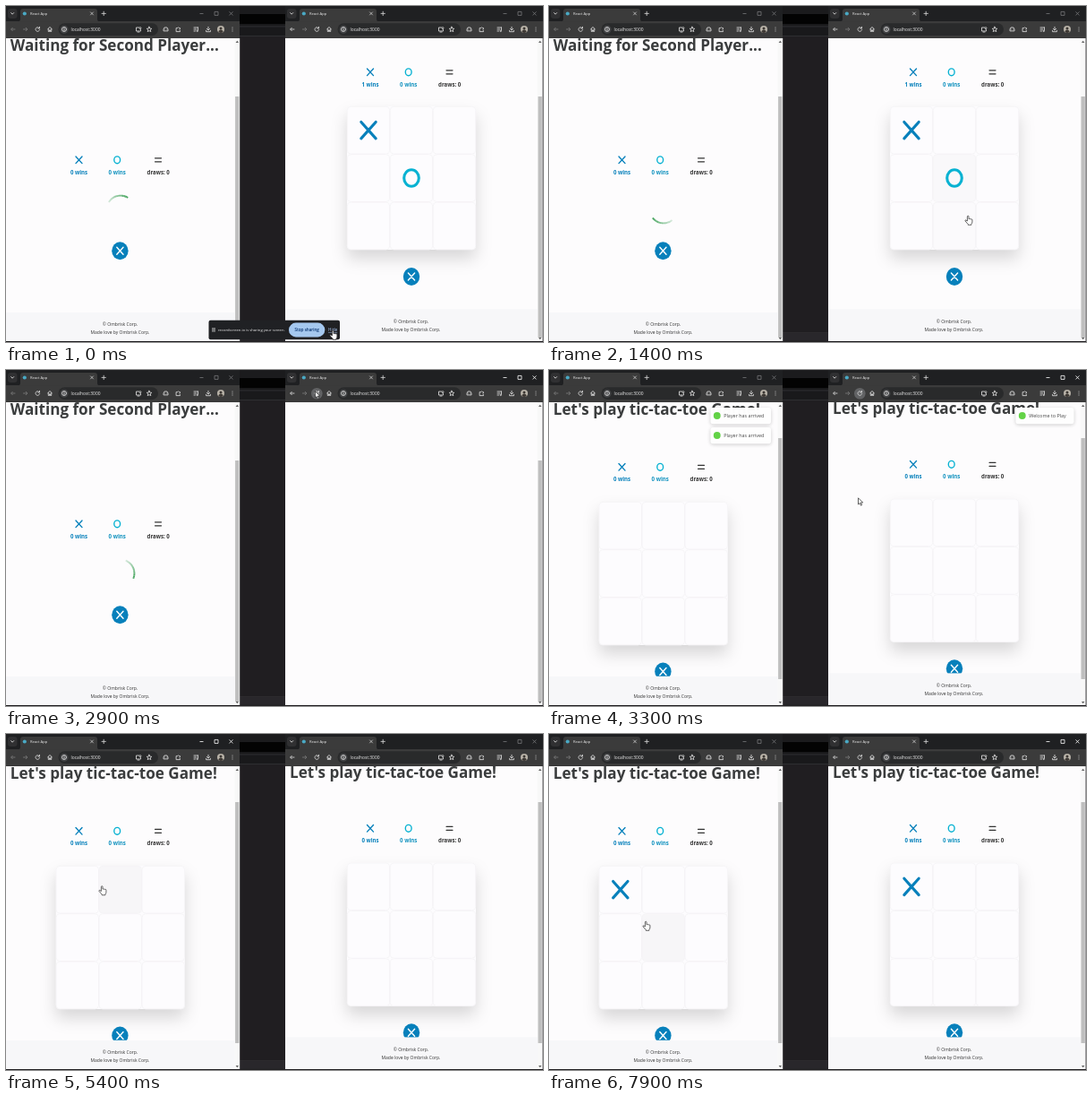
An HTML page for the animation above (8000 ms loop, 600 px wide and 375 px high).

```html
<!DOCTYPE html>
<html lang="en">
<head>
<meta charset="utf-8">
<title>Tic-tac-toe, two players</title>
<style>
  html, body { margin: 0; width: 100%; height: 100%; overflow: hidden; background: #201e21; }
  #stage { display: block; width: 600px; height: 375px; font-family: "Open Sans", "Noto Sans", sans-serif; }
  .h1 { font-size: 17.1px; font-weight: 700; fill: #3a3c3d; }
  .score { font-size: 6.1px; font-weight: 700; text-anchor: middle; }
  .foot { font-size: 5px; fill: #333; text-anchor: middle; }
  .toast text { font-size: 5.5px; fill: #444; }
  .toast rect { fill: #fff; filter: drop-shadow(0 1px 2px rgba(0, 0, 0, .2)); }
  .board { fill: #fdfcfe; filter: drop-shadow(0 10px 9px rgba(0, 0, 0, .15)); }
  .icon { fill: none; stroke: #d4d4d4; stroke-width: .9; stroke-linecap: round; stroke-linejoin: round; }
</style>
</head>
<body>
<svg id="stage" viewBox="0 0 600 375"></svg>
<script>
const LOOP = 8000, STEP = 100;
const BLUE = '#0780bb', CYAN = '#08b2d2', INK = '#333';
const CELL_W = 48, CELL_H = 53.4;

const rect = (x, y, w, h, fill, r = 0, more = '') =>
  `<rect x="${x}" y="${y}" width="${w}" height="${h}" rx="${r}" fill="${fill}" ${more}/>`;
const line = (d, color, width, more = '') =>
  `<path d="${d}" fill="none" stroke="${color}" stroke-width="${width}" stroke-linecap="round" ${more}/>`;
const label = (x, y, text, attrs) => `<text x="${x}" y="${y}" ${attrs}>${text}</text>`;
const cross = (x, y, rx, ry, color, width, more) =>
  line(`M${x - rx} ${y - ry}L${x + rx} ${y + ry}M${x + rx} ${y - ry}L${x - rx} ${y + ry}`, color, width, more);
const ring = (x, y, rx, ry, width) =>
  `<ellipse cx="${x}" cy="${y}" rx="${rx}" ry="${ry}" fill="none" stroke="${CYAN}" stroke-width="${width}"/>`;
const at = (x, y, body) => `<g transform="translate(${x} ${y})">${body}</g>`;
const icon = (x, d) => at(x, 26, `<path class="icon" d="${d}"/>`);

function score(x, y, xWins) {
  return cross(x, y, 3.5, 3.8, BLUE, 1.4) + ring(x + 42.7, y, 3.4, 3.9, 1.4) +
    line(`M${x + 85} ${y - 2}h7M${x + 85} ${y + 2}h7`, INK, 1.2) +
    label(x, y + 15.9, `${xWins} wins`, `class="score" fill="${BLUE}"`) +
    label(x + 42.7, y + 15.9, '0 wins', 'class="score" fill="#1192bf"') +
    label(x + 88.7, y + 15.9, 'draws: 0', `class="score" fill="${INK}"`);
}

function badge(x, y) {
  return `<ellipse cx="${x}" cy="${y}" rx="9.2" ry="10" fill="${BLUE}"/>` + cross(x, y, 3.6, 4, '#fff', 1.4);
}

function board(x, y, id) {
  let s = rect(x, y, 144, 160, '#fdfcfe', 5, 'class="board"');
  for (let i = 0; i < 9; i++) {
    s += rect(x + i % 3 * CELL_W + .3, y + (i / 3 | 0) * CELL_H + .3, CELL_W - .6, CELL_H - .6, '#fdfcfe', 4,
      `stroke="#f5f4f7" stroke-width=".9" id="${id}${i}"`);
  }
  return s;
}

const bigCross = (x, y, more) => cross(x + 24, y + 26.7, 8.2, 9.2, BLUE, 3.1, more);

function toast(id, x, y, w, text) {
  return `<g class="toast" id="${id}">` + rect(x, y - 9.3, w, 18.6, '#fff', 3) +
    `<circle cx="${x + 7.4}" cy="${y}" r="4" fill="#61d345"/>` +
    line(`M${x + 5.6} ${y + .2}l1.3 1.4l2.4 -3`, '#fff', 1, 'class="tick"') +
    label(x + 15, y + 2, text, '') + '</g>';
}

function footer(x, w, cx, y) {
  return rect(x, y, w, 40, '#f7f7f9') +
    label(cx, y + 15.6, '© Ombrisk Corp.', 'class="foot"') +
    label(cx, y + 24.2, 'Made love by Ombrisk Corp.', 'class="foot"');
}

const scene = (id, body) => `<g id="${id}">${body}</g>`;

const page = (x, w, body) =>
  `<svg x="${x}" y="36" width="${w}" height="338" viewBox="${x} 36 ${w} 338">` +
  rect(x, 36, w, 338, '#fdfcfd') + body + '</svg>';

function scrollbar(id, x) {
  return rect(x, 36, 5.8, 338, '#f8f8f8') + rect(x + .7, 101, 4.3, 269, '#bfbfbf', 0, `id="${id}"`) +
    `<path d="M${x + 1.2} 41l1.7-2.2 1.7 2.2zM${x + 1.2} 370l1.7 2.2 1.7-2.2z" fill="#606060"/>`;
}

function chrome(id, x, right, boxEnd, backColor) {
  const r = n => right - n;
  return rect(x, 0, right - x, 20, '#1f2022') + rect(x, 17, right - x, 19, '#3b3b3b') +
    rect(x + 2, 3, 10.5, 11, '#303032', 3) + line(`M${x + 5.7} 7.6l1.5 1.6l1.5 -1.6`, '#ddd', .9) +
    `<path d="M${x + 13} 17.5q3 0 3-3V6q0-3 3-3h80q3 0 3 3v8.5q0 3 3 3z" fill="#3b3b3b"/>` +
    `<circle cx="${x + 20.8}" cy="8.5" r="2.1" fill="#49a9c4"/>` +
    label(x + 27, 10, 'React App', 'font-size="4.1" fill="#eee"') +
    cross(x + 96, 8.4, 1.5, 1.5, '#ddd', .7) + line(`M${x + 107} 8.4h4.4m-2.2-2.2v4.4`, '#ddd', .8) +
    `<path id="${id}ctl" d="M${r(44.5)} 8.5h4M${r(28)} 6.4h4v4h-4zM${r(11.5)} 6.4l4 4m0-4l-4 4" fill="none" stroke-width=".8"/>` +
    (id === 'R' ? '<circle id="reload" cx="347.3" cy="26.2" r="6.3" fill="#626365"/>' : '') +
    `<g style="--c:${backColor}">` +
    at(x + 8, 26, `<path d="M2.4 0h-4.8m2-2l-2 2l2 2" fill="none" stroke="${backColor}" stroke-width=".9"/>`) +
    at(x + 21.5, 26, '<path d="M-2.4 0h4.8m-2-2l2 2l-2 2" fill="none" stroke="#777" stroke-width=".9"/>') + '</g>' +
    icon(x + 35.3, 'M2 -1.2A2.3 2.3 0 1 0 2.3 .6M2.2 -2.7v1.7h-1.7') +
    icon(x + 49, 'M-2.3 -.3L0 -2.5L2.3 -.3M-1.7 -.5v3h1.2v-1.7h1v1.7h1.2v-3') +
    rect(x + 58.5, 19.3, boxEnd - x - 58.5, 13.6, '#292a2b', 6.8) +
    `<circle cx="${x + 65}" cy="26.2" r="4.6" fill="#414244"/>` +
    icon(x + 65, 'M0 -.3v1.7M0 -1.6v.1M2.5 0a2.5 2.5 0 1 1-5 0a2.5 2.5 0 1 1 5 0') +
    label(x + 72.5, 28.2, 'localhost:3000', 'font-size="4.9" fill="#eee"') +
    icon(boxEnd - 22, 'M.5 -2h-3v4h5v-1.4M-1 3h2M2 -2.6v2.4m-1-1l1 1l1-1') +
    icon(boxEnd - 10, 'M0 -2.8l.8 1.9 2 .2-1.5 1.3.5 2L0 1.6l-1.8 1 .5-2-1.5-1.3 2-.2z') +
    icon(r(82.5), 'M-2.5 1.5v-1.5l1-2h3l1 2v1.5zM-1.4 .2h.1M1.4 .2h.1') +
    icon(r(68.5), 'M-2 -1.4h1.2q.8-1.8 1.6 0h1.2v1.3q-1.6.8 0 1.6v1.1h-4z') +
    icon(r(48.5), 'M-2.5 -2h4.5M-2.5 0h2.6M-2.5 2h1.5M2 -2v3.5a.8.8 0 1 1-.8-.5') +
    icon(r(35), 'M0 -2.7v3.6m-1.6-1.5l1.6 1.6l1.6-1.6M-2.4 1.3v1.4h4.8v-1.4') +
    at(r(21), 26, '<circle r="4" fill="#b9b3a8"/><circle cy="-1" r="1.5" fill="#3d3834"/>' +
      '<path d="M-2.7 2.9q.3-2.5 2.7-2.5t2.7 2.5q-2.7 2-5.4 0z" fill="#3d3834"/>') +
    icon(r(8), 'M0 -2v.1M0 0v.1M0 2v.1');
}

function desktop() {
  return rect(0, 0, 600, 375, '#201e21') + rect(261, 0, 51, 9, '#1b1b1d') + rect(261, 9, 51, 11, '#030303') +
    rect(261, 20, 51, 14, '#19191b') + rect(261, 22.5, 51, .8, '#353538') + rect(261, 33, 51, .8, '#343437') +
    rect(261, 364.5, 51, .8, '#38363a') + rect(261, 365.3, 51, 8.5, '#29272b');
}

function shareBar() {
  return scene('share', rect(226.5, 350.8, 146.5, 21.4, '#202124', 2) +
    line('M231 359.4v4M233 359.4v4', '#ddd', .9) +
    label(237, 363, 'recordscreen.io is sharing your screen.', 'font-size="4.16" fill="#eee"') +
    rect(316, 353.6, 40.3, 15.8, '#a5c8ef', 7.9) +
    label(336.2, 363.2, 'Stop sharing', 'font-size="4.7" fill="#123d79" stroke="#123d79" stroke-width=".12" text-anchor="middle"') +
    label(360, 363, 'Hide', 'font-size="4.7" fill="#a9c7f5" text-decoration="underline"'));
}

// Quarter arc with its head at angle 0, fading towards the tail.
function spinner() {
  let s = '';
  for (let i = 0; i < 15; i++) {
    const p = a => `${15.4 * Math.cos(a)} ${15.4 * Math.sin(a)}`;
    const a = -i * Math.PI / 30;
    s += `<path d="M${p(a)}A15.4 15.4 0 0 0 ${p(a - .11)}" fill="none" stroke="#43a35c" stroke-width="1.9" opacity="${1 - i / 18}"/>`;
  }
  return at(128, 227, `<g id="spin">${s}</g>`);
}

const L_BOARD = [55.8, 147], R_GAME = [381, 112], R_PLAY = [381, 143.7];
const playTitle = "Let's play tic-tac-toe Game!";

const leftPage = page(0, 256,
  scene('lWait', label(4.8, 49.6, 'Waiting for Second Player...', 'class="h1"') +
    score(81.5, 171.8, 0) + spinner() + badge(127.4, 273.2)) +
  scene('lPlay', label(4.8, 49.6, playTitle, 'class="h1"') + score(81.5, 108.3, 0) +
    board(...L_BOARD, 'l') + bigCross(...L_BOARD, 'id="lX"') + badge(127.4, 336.5)) +
  footer(0, 256, 127.5, 341.8) +
  toast('t0', 180, 52.3, 68.5, 'Player has arrived') + toast('t1', 180, 74.3, 68.5, 'Player has arrived'));

const rightPage = page(312, 282,
  scene('rGame', score(407, 73.8, 1) + board(...R_GAME, 'g') + bigCross(...R_GAME, '') +
    ring(453, 192, 8.3, 9.2, 3.1) + badge(453, 302)) +
  scene('rPlay', label(317, 48.6, playTitle, 'class="h1"') + score(407, 105.3, 0) +
    board(...R_PLAY, 'r') + bigCross(...R_PLAY, 'id="rX"') + badge(453, 333.3)) +
  scene('rFoot', footer(312, 282, 452.5, 338.4)) +
  toast('t2', 521, 52.3, 66, 'Welcome to Play'));

const cursors =
  '<path id="arrow" d="M-2.5 -4.2v7.2l1.7-1.5 1.2 2.7 1.2-.5-1.2-2.7h2.3z" fill="#fff" stroke="#222" stroke-width=".7"/>' +
  '<path id="hand" d="M-1.6 1V-3.9q0-.9.8-.9t.8.9v2.6q.7-.6 1.4 0 .7-.4 1.3.2 1.2-.2 1.2.9v2.2q0 1.4-1 2.4v.9h-3.7v-.8L-4 .9q-.3-1 .7-1z" fill="#fff" stroke="#333" stroke-width=".75"/>';

const stage = document.getElementById('stage');
stage.innerHTML = desktop() +
  chrome('L', 0, 261, 170, '#777') + leftPage + scrollbar('lBar', 255.4) +
  chrome('R', 312, 600, 508, '#ccc') + rightPage + scrollbar('rBar', 593.8) +
  shareBar() + scene('cursor', cursors);

const $ = id => document.getElementById(id);
const show = (id, on) => { $(id).style.display = on ? '' : 'none'; };

// time, x, y of the pointer
const path = [
  [0, 366, 367], [100, 366, 367], [500, 430, 335], [900, 455, 306], [1100, 452, 245], [1200, 454, 200],
  [1300, 460, 205], [1400, 469, 239], [1600, 468, 180], [1800, 445, 100], [2300, 395, 36], [2700, 348, 28],
  [2900, 348, 28], [3300, 348, 147], [3800, 348, 147], [4400, 108, 174], [4600, 108, 174], [4700, 108, 174.5],
  [5800, 108, 174.5], [6300, 387, 175.5], [7400, 387, 175.5], [7700, 109, 214], [LOOP, 109, 214]
];

function pointer(t) {
  t = Math.max(0, t);
  const i = path.findIndex(k => k[0] > t);
  const [t0, x0, y0] = path[i - 1], [t1, x1, y1] = path[i];
  const p = (t - t0) / (t1 - t0);
  return [x0 + (x1 - x0) * p, y0 + (y1 - y0) * p];
}

function hoveredCell(t) {
  const [px, py] = pointer(t);
  const boards = t < 2900 ? { g: R_GAME } : t < 3000 ? {} : { l: L_BOARD, r: R_PLAY };
  for (const id in boards) {
    const col = Math.floor((px - 1 - boards[id][0]) / CELL_W);
    const row = Math.floor((py - 4 - boards[id][1]) / CELL_H);
    if (col >= 0 && col < 3 && row >= 0 && row < 3) return id + (row * 3 + col);
  }
  return '';
}

function setToast(id, t) {
  const enter = 1 - (1 - Math.min(1, Math.max(0, (t - 3100) / 350))) ** 4;
  const leave = 1 - (1 - Math.min(1, Math.max(0, (t - 4900) / 400))) ** 3;
  const el = $(id), scale = .6 + .4 * enter - .4 * leave;
  show(id, t >= 3100 && leave < 1);
  el.style.transformBox = 'fill-box';
  el.style.transformOrigin = 'center';
  el.style.transform = `translateY(${-37 * (1 - enter) - 28 * leave}px) scale(${scale})`;
  el.style.opacity = (.5 + .5 * enter) * (1 - leave);
  el.querySelector('.tick').style.opacity = Math.min(1, Math.max(0, (t - 3300) / 200));
}

function render(t) {
  const playing = t >= 3000;
  show('share', t < 200);
  show('lWait', !playing);
  show('lPlay', playing);
  show('rGame', t < 2900);
  show('rPlay', playing);
  show('rFoot', t < 2900 || playing);
  show('rX', t >= 6900);
  show('lX', t >= 7000);
  show('reload', t >= 2700 && t < 3500);
  $('spin').setAttribute('transform', `rotate(${302 + t * .4})`);
  for (const id of ['lBar', 'rBar']) $(id).setAttribute('y', playing ? 76 : 101);

  const active = t < 2800 ? '' : t < 5000 || t >= 6900 ? 'R' : 'L';
  for (const id of ['L', 'R']) $(id + 'ctl').setAttribute('stroke', id === active ? '#fff' : '#77787a');
  for (const id of ['t0', 't1', 't2']) setToast(id, t);

  // Hover shade builds up and fades over three steps.
  const shade = {};
  for (let k = 0; k < 3; k++) {
    const id = hoveredCell(t - k * STEP);
    shade[id] = (shade[id] || 0) + 1 / 3;
  }
  for (const b of 'lgr') for (let i = 0; i < 9; i++) {
    const s = shade[b + i] || 0;
    $(b + i).setAttribute('fill', `rgb(${253 - 6 * s},${252 - 6 * s},${254 - 6 * s})`);
  }

  const [x, y] = pointer(t);
  const hand = t < 200 || hoveredCell(t) !== '';
  $('cursor').setAttribute('transform', `translate(${x} ${y})`);
  show('hand', hand);
  show('arrow', !hand);
}

const start = performance.now();
function tick() {
  const t = (performance.now() - start) % LOOP;
  render(Math.floor(t / STEP) * STEP);
  requestAnimationFrame(tick);
}
tick();
</script>
</body>
</html>
```
